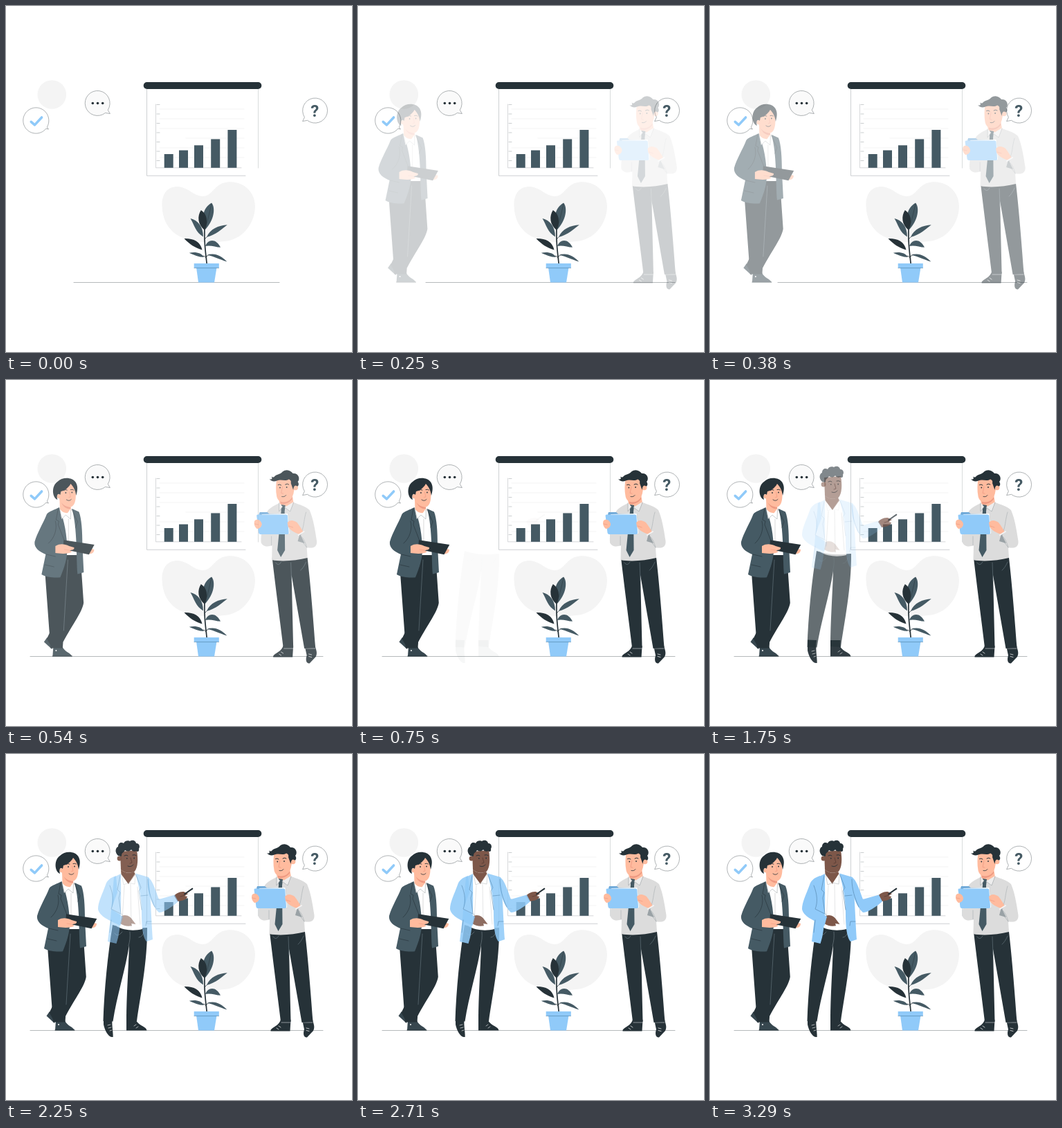
Recreate the animation shown at these times as an HTML page with a canvas. Size 500x500 px, loop 3430 ms.

```html
<!DOCTYPE html>
<html lang="en">
<head>
<meta charset="utf-8">
<title>Team presentation</title>
<style>
html, body { margin: 0; width: 100%; height: 100%; overflow: hidden; background: #fff; }
canvas { display: block; width: 500px; height: 500px; }
</style>
</head>
<body>
<canvas id="stage"></canvas>
<script>
const LOOP = 3430, SIZE = 500;
const INK = '#263238', SLATE = '#455a64', BLUE = '#90caf9', PALE = '#f4f4f4';
const PEACH = '#ffbb9e', BLUSH = '#ee9a82', BROWN = '#7d5749', UMBER = '#563a33';
const scale = window.devicePixelRatio || 1;

const stage = document.getElementById('stage');
const layer = document.createElement('canvas');
for (const c of [stage, layer]) c.width = c.height = SIZE * scale;
const main = stage.getContext('2d'), buffer = layer.getContext('2d');
let g = main;

function fill(d, color) {
  g.fillStyle = color;
  g.fill(new Path2D(d));
}
function line(d, color = INK, width = 0.7) {
  g.strokeStyle = color;
  g.lineWidth = width;
  g.stroke(new Path2D(d));
}
function dot(x, y, r, color) {
  g.fillStyle = color;
  g.beginPath();
  g.arc(x, y, r, 0, Math.PI * 2);
  g.fill();
}
function reset(c) {
  c.setTransform(scale, 0, 0, scale, 0, 0);
  c.globalAlpha = 1;
  c.clearRect(0, 0, SIZE, SIZE);
  c.lineCap = c.lineJoin = 'round';
}

// cubic-bezier(.36, -.01, .5, 1.38): eases in, overshoots slightly, settles
function ease(t) {
  if (t <= 0) return 0;
  if (t >= 1) return 1;
  const curve = (u, a, b) => 3 * (1 - u) ** 2 * u * a + 3 * (1 - u) * u * u * b + u ** 3;
  let lo = 0, hi = 1;
  for (let i = 0; i < 24; i++) {
    const mid = (lo + hi) / 2;
    if (curve(mid, 0.36, 0.5) < t) lo = mid; else hi = mid;
  }
  return curve(lo, -0.01, 1.38);
}
const clamp = v => Math.max(0, Math.min(1, v));
const fade = (t, start, length) => clamp(ease((t - start) / length));

function bubble(d, color) {
  fill(d, color);
  line(d, '#8b9194', 0.7);
}

function bubbles() {
  dot(66.3, 128, 20.8, PALE);
  bubble('M61 178 L58 177 A18.6 18.6 0 1 1 59.6 174.6 Z', '#fff');
  line('M36.3 167.3 L41.5 171.9 L51.6 161', BLUE, 3.6);
  bubble('M150 155.5 L143.5 154.5 A18 18 0 1 1 147.5 150 Z', '#fafafa');
  for (let i = 0; i < 3; i++) dot(125.3 + i * 7.2, 140.5, 1.8, INK);
  bubble('M429 166.5 L435.5 165.3 A18 18 0 1 0 431.2 160.5 Z', '#fff');
  g.fillStyle = SLATE;
  g.font = 'bold 24px Roboto, Arial, sans-serif';
  g.textAlign = 'center';
  g.fillText('?', 446.3, 159.8);
}

function board() {
  fill('M203.5 118 H364.5 V245.5 H203.5 Z', '#fff');
  line('M203.5 120 V245.3 H346', '#b9bec0', 0.7);
  line('M364.5 120 V234', '#c9cdcf', 0.7);
  g.fillStyle = INK;
  g.beginPath();
  g.roundRect(198.7, 110, 170.6, 10, 5);
  g.fill();
  for (let y = 149; y < 225; y += 14) line(`M${y === 191 ? 260 : 222} ${y} H344`, '#f0f0f0', 0.7);
  for (let i = 0; i < 7; i++) line(`M218 ${142.5 + i * 13.5} H222`, '#b4b9bb', 0.7);
  line('M216.5 142 V233.8 H340', '#c4c8ca', 0.7);
  [[228.7, 214], [250, 208.5], [272, 201.3], [296.2, 192.4], [320.4, 179]]
    .forEach(([x, y]) => fill(`M${x} ${y} h13 V233.8 h-13 Z`, SLATE));
}

function plant() {
  fill('M225.5 289 C225 268 236 260 250 261 C264 263 271 274 284 275 C297 275 299 262 313 256 C336 249 360 264 360 290 C359 318 339 338 316 340 C293 343 264 342 246 330 C233 321 226 307 225.5 289 Z', PALE);
  line('M290.3 373 C287.5 350 286.5 340 287 318', INK, 1.7);
  line('M290 365 Q288 361 285 361 M289.5 363 Q290 360 294 359 M287 337 Q290 334 292 332', INK, 0.8);
  fill('M288 323 C282 307 284 292 297 284.5 C303 291 301 309 288 323 Z', SLATE);
  fill('M287 324 C277 316 276 304 281.8 295 C290 300 293 311 287 324 Z', INK);
  line('M288 322 Q293 304 297 286', INK, 0.5);
  fill('M285 333.5 C274 327 272 316 266.5 307 C277 309.5 285 318 285 333.5 Z', SLATE);
  fill('M290 334 C295 322 307 317 319.8 316.2 C311 323 304 330 290 334 Z', SLATE);
  fill('M283.5 352.5 C273 349.5 265 344 257.5 336 C270 335.5 281 340 283.5 352.5 Z', INK);
  fill('M288 347 C292 336 304 336 310 348.8 C303 348.5 295 345 288 347 Z', SLATE);
  fill('M286 363 C278 363 272 360 264.8 356.8 C273 355 282 356 286 363 Z', SLATE);
  fill('M291 360 C301 356 311 361 319.3 369.5 C308 366 301 362 291 360 Z', SLATE);
  fill('M275 378 H304.5 L301 399.5 H278 Z', BLUE);
  fill('M271.7 372 H307.8 V378.6 H271.7 Z', BLUE);
  line('M272 378.6 H307.5', '#4a7da3', 0.6);
}

function woman() {
  fill('M63 372 L71.5 384 L70 389 L58.5 378.5 Z', '#37474f');
  fill('M72 385 H85 C88 393 97 394 99 399.3 H71 Z', '#37474f');
  line('M71 399 H99', INK, 1);
  dot(76, 391, 1, '#fff');
  fill('M88 252 H111 L115.8 322 C114 335 100 353 86.5 378 L69 385 L62.5 374 L84 330 Z', INK);
  fill('M60 270 H98 C93 300 89 340 85.5 387.5 H68 L60.3 282 Z', INK);
  line('M93 260 Q90 310 87 362', '#6b7b83', 0.6);
  fill('M81 186 H98 L106 202 V253 H90 Z', '#fff');
  fill('M99 186 L109 190.5 C113 200 114 220 114 238 L116 278 L107 280.5 C105 258 107 215 99 186 Z', SLATE);
  fill('M80.5 184 C74 188 66 189 62.5 194 C57 208 49 220 45 234 C44 243 52 248 61 252 L55 281 C63 285.5 74 286 82 285.3 C88 271 92 258 92 246 C92 225 88 203 80.5 184 Z', SLATE);
  line('M75 204 C78 215 74 228 65 236 M62 252 L75 255 M60 267 L73 270', INK, 0.6);
  line('M79 186 L76 202 L80 204 L79 209 L91 240 M99 187 L107 205 L104 213', INK, 0.6);
  line('M94 201 V232', '#c2c2c2', 0.6);
  // neck and head
  fill('M81 170 L97 178 L97.5 189 C94 194 87 193 81.5 187 Z', PEACH);
  fill('M83 175 C87 181 91 183 97 184 L97 186 C90 187 85 182 83 175 Z', BLUSH);
  fill('M81 156 C82 147 102 147 104 157 C105.5 170 104 182 97 183.5 C89 183.5 82 178 80.5 171 Z', PEACH);
  dot(80.3, 168, 3.1, PEACH);
  fill('M78 173 C70 170 69 153 78 147 C85 140 99 140 104.5 148 C108 154 107 160 105 167 C104 159 101 154 97 150 C94 156 88 160 83 161 L82 166 C79 163 76 166 78 173 Z', INK);
  line('M87 159.5 q3 -2 5 -.5 M97 158.5 q3 -1 4.5 .5', INK, 0.9);
  dot(90, 163, 0.9, INK);
  dot(99, 162.5, 0.9, INK);
  line('M95.5 162 L97 169 L94.5 169.5', BLUSH, 0.7);
  line('M91 173 Q95 176 98 172.5', INK, 0.8);
  fill('M81 186 L89 196 L84 201 Z M97 186 L90 196 L97 201 Z', '#fff');
  line('M81 186 L84.5 200.5 L90 195 L97 201 L97.5 187', '#8f9699', 0.5);
  // tablet and hands
  fill('M124 243 L131 245 C131 249 128 252 122 251 Z', PEACH);
  fill('M87 231.3 L131.3 238 L123.5 252.3 L86 244.5 Z', INK);
  fill('M75 240 C82 236 88 237 95 240 L102 242 C103 245 99 246 95 246 L99 248 C94 252 82 251 75 250 Z', PEACH);
  line('M95 246 L88 245', BLUSH, 0.6);
}

function clerk() {
  fill('M397 384 H411.5 L410.5 400.5 H382.5 C382 395 394 394 397 384 Z', INK);
  fill('M428 384 H443 C444 389 447 394 444 400 L435 409.5 C430 410 429 404 431 398 Z', INK);
  line('M391 396 l3 2 M394 393 l3 2 M434 396 l4 1 M434 399.5 l4 1', '#fff', 0.7);
  line('M398 388 H411 M429 388 H443', '#a7adb0', 0.8);
  fill('M381 257 H432 C436 290 440 340 443.5 386.5 L427.5 388 L409 282 L411.5 387 L397 386.5 C392 345 386 300 381 257 Z', INK);
  line('M408 264 L409 290 M386 264 Q390 270 394 263 M430 263 Q426 272 422 275', '#6b7b83', 0.6);
  // shirt
  fill('M391 178 C383 182 375 186 373 192 C368 209 364 222 365 235 C368 242 376 241 381 239 L380.5 260 C395 263 416 261 432 257 L431 242 C441 244 446 241 445.5 233 C443 216 440 199 435 188 C429 182 420 180 412 177 Z', '#dcdcdc');
  line('M430 191 C427 201 427 209 425 215 L421 229 L431 242 M380 226 V239 M431 242 Q428 230 423 226', '#aeb4b6', 0.7);
  fill('M421 222 L428 236 L418 233 Z', '#9aa2a6');
  fill('M390 168 L410 166 L412 178 C408 184 399 183 392 180 Z', PEACH);
  fill('M393 175 C400 177 406 175 410 169 L410 172 C406 178 399 180 393 179 Z', BLUSH);
  fill('M394 180 L400 181 L399 190 L399.5 246 L393.5 256 L388.5 246 L394 190 Z', SLATE);
  fill('M391 177 L396 183 L391 190 Z M412 176 L399 184 L407 190 Z', '#ededed');
  line('M391 178 L391 190 L396 183 M399 184 L407 190 L412 177', '#9ba2a5', 0.6);
  // head
  fill('M388 141 L413 143 C414 160 412 172 403 175.5 C396 178 389 176 387.5 168 C386 160 386 150 388 141 Z', PEACH);
  dot(414.7, 155.5, 3.7, PEACH);
  fill('M388 145.5 C384 147 381 147 377 143.5 C380 144 382 143 380 139.5 C384 142 384 139 386 138 C390 136 393 136 396 132.5 C402 128 408 131 411 135 C419 134 422 143 418 147 C421 151 418 155 416.5 153 C413 151 412 155 411.5 159 L408 149 C409 146 407 144 405 143.5 C400 147 394 143 388 145.5 Z', INK);
  line('M389.5 151.5 q2.5 -1.5 4.5 .5 M400 151 q3 -2 5 0', INK, 1);
  dot(392.3, 155.5, 0.9, INK);
  dot(402, 155, 0.9, INK);
  line('M396 154 L394 163.5 L397 164', BLUSH, 0.8);
  line('M395 168.5 Q399 169.5 401 166.5', INK, 0.8);
  // folder and hands
  fill('M362 194 L363 191 H374 L377 193.5 H402 V223 H366 Z', '#6fa9d8');
  fill('M366 194 L404 193 L407 222 L370 223 Z', '#fff');
  line('M404 193 L406.5 222', '#c0c5c8', 0.6);
  fill('M358.5 196 Q358.5 194.5 360 194.5 H401 Q403 194.5 403.3 196 L405 221 Q405 223 403 223 H364 Q362 223 361.5 221 Z', BLUE);
  fill('M356 203 C360 200 365 203 366 208 C366 212 363 215 359 215 C355 212 354 206 356 203 Z', PEACH);
  fill('M403 206 C407 201 413 203 417 206 C421 211 424 216 426 220 L421 223 C414 221 407 217 404 212 Z', PEACH);
  line('M405 211 L411 213 M356 208 L361 209', BLUSH, 0.7);
  line('M427 219 L419 224', '#f4f4f4', 2);
}

function speakerShoes() {
  fill('M141 375.5 L154 376 C152 390 155 400 154.7 409 C148 410 143 400 141 391 Z', INK);
  fill('M174 376 H188.5 V386 C193 393 203 394 203.5 399.5 H174 Z', INK);
  line('M147 392 l4 -1 M148 396 l4 -1 M150 400 l3 -1 M188 391 l-3 2 M191 394 l-3 2', '#fff', 0.6);
}

function speakerTrousers() {
  fill('M154 247 C175 254 190 252 204 251 C204.5 300 194 350 189 386 L174 385 C174 350 177 310 178 276 C173 310 160 350 154.5 386.5 L140.5 386 C142 340 147 290 154 247 Z', INK);
  line('M179 257 Q180 268 177 277 M157 259 Q161 266 168 257 M199 257 Q198 264 192 265', '#77858b', 0.6);
}

function speakerShirt() {
  fill('M166 173 L176 189 L187 172 L197 200 V253 C185 256 170 255 160 249 Z', '#fff');
  line('M180 188 L181 250 M171 190 L168 240 M190 192 L194 246', '#d3d6d7', 0.6);
}

function speakerHead() {
  fill('M166 167 C171 172 178 173 185 170 L187 174 L177 188 L166.5 174 Z', BROWN);
  fill('M165 141 L189 139 C191 151 191 164 185.5 170 C178 173 171 172 166 167 Z', BROWN);
  dot(164, 151, 3.4, BROWN);
  fill('M162 147 C156 141 159 135 162 134 C162 128 167 127 170 129 C172 124 178 125 179 126 C183 123 188 126 188 129 C193 129 194 134 192 137 C193 141 190 142 188 140 C185 142 182 140 181 138 C178 142 174 140 172 139 C170 143 167 142 167 147 C166 149 165 147 162 147 Z', INK);
  line('M171 147 q3 -2 5 0 M183 146 q3 -1 5 .5', INK, 1);
  dot(174.8, 150.8, 0.9, INK);
  dot(185.2, 150.5, 0.9, INK);
  line('M180 150 L182 157 L179 158', UMBER, 0.8);
  line('M176 162 Q181 164 184 160', INK, 0.9);
}

function speakerHand() {
  fill('M243 205 C247 200 252 199 257 199 L263 202 L258 205 L262 206 C261 210 256 212 248 213 Z', BROWN);
  line('M258 202.5 L269.3 194.6', INK, 2);
  line('M252 206 L259 204', UMBER, 0.7);
}

function speakerJacket() {
  fill('M167 234 C174 231 180 235 183 240 L187.5 246 L181 245 L182 248 C176 250 170 248 165 245 Z', BROWN);
  fill('M166 173 L156 178 L151 238 L147 271 L159.5 274 C168 252 166 205 166 173 Z', BLUE);
  fill('M159 176 C150 179 146 183 144 189 C139 203 133 214 133 224 C134 234 150 241 165.5 248 L169 235 L152 224 L161 200 Z', BLUE);
  fill('M187 172.5 L206 178 C209 200 210 240 212 268 L203 271 C197 264 196 245 196 230 C196 210 192 190 187 172.5 Z', BLUE);
  fill('M205 178 C212 182 216 197 221 210 L244 203.5 L249 213 C240 221 228 229 221 229 C213 222 206 207 205 190 Z', BLUE);
  line('M150 190 C155 203 156 214 152 224 L168 232 M165 176 L161 196 L165 200 L163 208 L166 230 M188 175 L195 193 L192 198 L196 225', '#4d7fa5', 0.6);
  line('M195 205 L205 204 M205 181 C205 195 209 208 215 221 M152 240 L150 258 M202 248 L203 242 L210 242', '#4d7fa5', 0.6);
  fill('M166 173 L176 187 L170 190 Z M187 172 L177 187 L186 189 Z', '#fff');
  line('M167 174 L170 189 L177 186 L186 188 L187 174', '#a2a9ac', 0.5);
}

// Draws a figure as one flat group, shifted and faded
function group(draw, dx, alpha) {
  reset(buffer);
  buffer.translate(dx, 0);
  g = buffer;
  draw();
  g = main;
  main.globalAlpha = alpha;
  main.drawImage(layer, 0, 0, SIZE, SIZE);
  main.globalAlpha = 1;
}

function part(draw, alpha) {
  if (alpha <= 0) return;
  main.globalAlpha = alpha;
  draw();
  main.globalAlpha = 1;
}

function render(t) {
  reset(main);
  main.fillStyle = '#fff';
  main.fillRect(0, 0, SIZE, SIZE);
  bubbles();
  board();
  line(`M${t < 500 ? 98 : 35} 399.5 H${t < 250 ? 395 : 458}`, '#959b9e', 0.7);
  plant();
  if (t >= 125) {
    const p = ease(t / 1000);
    group(woman, 20 * (p - 1), clamp(p));
    group(clerk, 20 * (1 - p), clamp(p));
  }
  const legs = fade(t, 550, 2500);
  part(speakerShoes, fade(t, 550, 1900));
  part(speakerTrousers, legs);
  part(speakerShirt, legs);
  part(speakerHead, fade(t, 790, 2300));
  part(speakerHand, legs);
  part(speakerJacket, fade(t, 1110, 2800));
}

const start = performance.now();
function tick() {
  render((performance.now() - start) % LOOP);
  requestAnimationFrame(tick);
}
tick();
</script>
</body>
</html>
```
